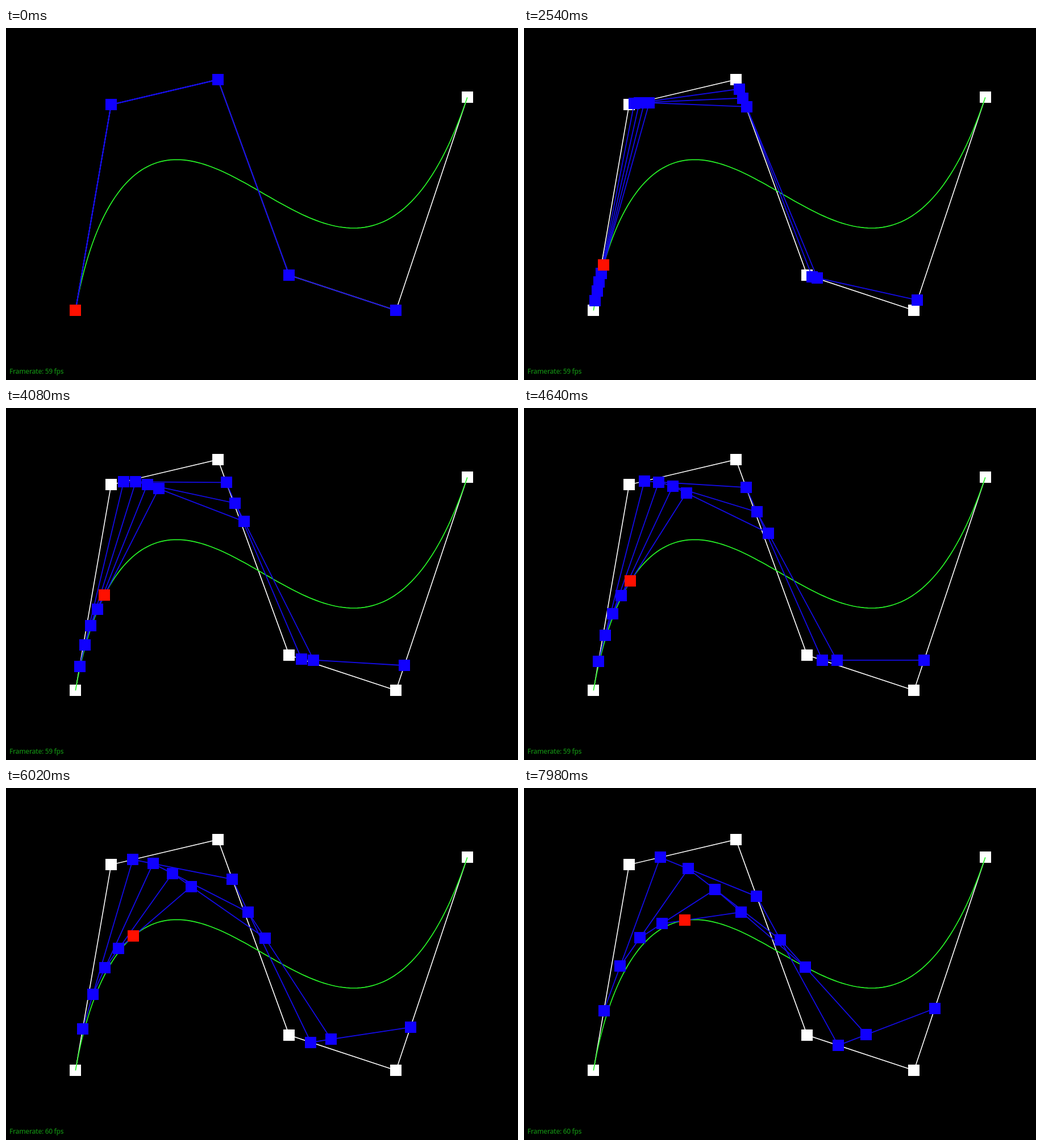
An HTML page with a canvas for the animation above (8000 ms loop, 901 px wide and 621 px high).

```html
<!DOCTYPE html>
<html lang="en">
<head>
<meta charset="utf-8">
<title>Curve construction</title>
<style>
html, body { margin: 0; width: 100%; height: 100%; overflow: hidden; background: #000; }
canvas { position: absolute; left: 0; top: 0; display: block; }
#rate {
  position: absolute; left: 6px; top: 598px;
  font: 600 12px/16px "Open Sans", "Noto Sans", sans-serif;
  letter-spacing: -0.35px; white-space: pre; color: #118011;
}
</style>
</head>
<body>
<canvas id="stage" width="901" height="621"></canvas>
<div id="rate">Framerate: 59 fps</div>
<script>
const LOOP = 8000;
const START_STEP = 33;      // the parameter stays at 0 until this step
const T_PER_STEP = 0.002092;
const RATE_STEP = 120;      // the frame counter switches here
const SIZE = 20;
const WHITE = '#fff', BLUE = '#1000ff', LINE_BLUE = '#140ce6', GREEN = '#28f528', RED = '#ff1000';

const controls = [
  [122.3, 498.3], [185, 135.3], [373, 91], [498.3, 436], [686.3, 498.3], [811.8, 122.4]
];

const ctx = document.getElementById('stage').getContext('2d');
const rate = document.getElementById('rate');

// Steps come in uneven triples lasting 20, 20 and 100 ms.
function stepAt(ms) {
  const u = ms + 20, r = u % 140;
  return 3 * Math.floor(u / 140) + (r < 20 ? 0 : r < 40 ? 1 : 2);
}

function reduce(points, t) {
  return points.slice(1).map(([x, y], i) => {
    const [px, py] = points[i];
    return [px + (x - px) * t, py + (y - py) * t];
  });
}

function pointOn(points, t) {
  while (points.length > 1) points = reduce(points, t);
  return points[0];
}

function polyline(points, color, width) {
  ctx.beginPath();
  points.forEach(([x, y]) => ctx.lineTo(x, y));
  ctx.strokeStyle = color;
  ctx.lineWidth = width;
  ctx.stroke();
}

function squares(points, color) {
  ctx.fillStyle = color;
  for (const [x, y] of points) {
    ctx.fillRect(Math.round(x - SIZE / 2), Math.round(y - SIZE / 2), SIZE, SIZE);
  }
}

const curve = Array.from({ length: 121 }, (_, i) => pointOn(controls, i / 120));

function draw(ms) {
  const step = stepAt(ms);
  const t = Math.max(0, step - START_STEP) * T_PER_STEP;

  ctx.fillStyle = '#000';
  ctx.fillRect(0, 0, 901, 621);
  polyline(controls, WHITE, 1.6);
  squares(controls, WHITE);
  polyline(curve, GREEN, 1.7);

  let level = reduce(controls, t);
  while (level.length > 1) {
    polyline(level, LINE_BLUE, 1.8);
    squares(level, BLUE);
    level = reduce(level, t);
  }
  squares(level, RED);

  const label = `Framerate: ${step < RATE_STEP ? 59 : 60} fps`;
  if (rate.textContent !== label) rate.textContent = label;
}

const origin = performance.now();
function tick() {
  draw((performance.now() - origin) % LOOP);
  requestAnimationFrame(tick);
}
tick();
</script>
</body>
</html>
```
